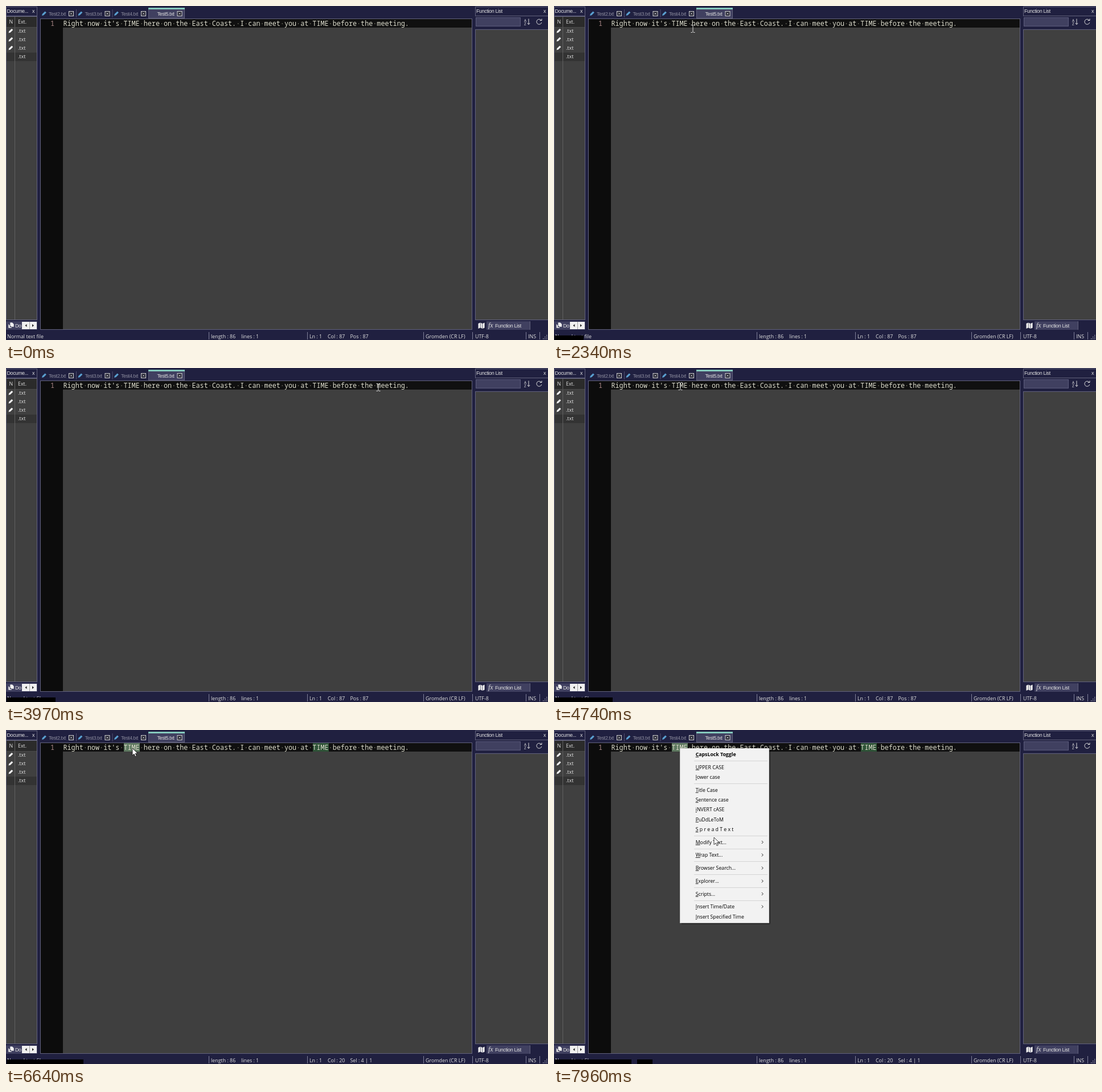
An HTML page for the animation above (7990 ms loop, 952 by 588 pixels).

```html
<!DOCTYPE html>
<html lang="en">
<head>
<meta charset="utf-8">
<title>Editor context menu</title>
<style>
  html, body { margin: 0; width: 100%; height: 100%; overflow: hidden; background: #202040; }
  svg { display: block; width: 952px; height: 588px; }
  text { font-family: "Open Sans", sans-serif; font-size: 8.9px; fill: #e0e0e0; white-space: pre; }
  .tight { font-family: "Liberation Sans", sans-serif; font-size: 9px; letter-spacing: -.4px; }
  .dim { fill: #8a8a9c; }
  .code { font-family: "Noto Sans Mono", monospace; font-size: 11.77px; fill: #dcdccc; }
  .dot { fill: #80806f; }
  .item { font-size: 8.75px; fill: #000; }
  .line { fill: none; stroke: #dcdcdc; stroke-width: 1; }
</style>
</head>
<body>
<svg id="stage" viewBox="0 0 952 588"></svg>
<script>
const LOOP = 7990, SELECT_AT = 5200, MENU_AT = 6750;

const rect = (x, y, w, h, fill, extra = '') =>
  `<rect x="${x}" y="${y}" width="${w}" height="${h}" fill="${fill}" ${extra}/>`;
const frame = (x, y, w, h, fill, stroke) =>
  rect(x + .5, y + .5, w - 1, h - 1, fill, `stroke="${stroke}"`);
const text = (x, y, s, cls = '', extra = '') =>
  `<text x="${x}" y="${y}" class="${cls}" ${extra}>${s}</text>`;
const path = (d, extra = 'class="line"') => `<path d="${d}" ${extra}/>`;
const pencil = (x, y, color) =>
  path(`M${x} ${y + 8}l.8-3 4.7-4.6 2.4 2.2-4.8 4.6z`, `fill="${color}"`);

const EDGE = '#62627c', PANEL = '#404040', RAISED = '#404060';

function leftPanel() {
  const rows = [44, 59, 74, 89].map((y, i) =>
    (i < 3 ? pencil(4.5, y - 4.5, '#f0f0f0') : '') + text(21, y + 3.2, '.txt')).join('');
  return frame(0, 1, 55, 17, '#202040', EDGE) +
    text(1.5, 12, 'Docume...', 'tight') + text(46, 12, 'x', 'tight') +
    frame(0, 18, 55, 535, PANEL, EDGE) +
    rect(1, 19, 53, 18, '#2b2b2b') + rect(1, 82, 53, 15, '#333') +
    rect(15, 19, 1, 533, '#606060') + rect(1, 37, 53, 1, '#4a4a4a') +
    text(5.5, 30.5, 'N') + text(21, 30.5, 'Ext.') + rows +
    rect(0, 555, 55, 15, RAISED) +
    path('M4 560v7h6v-2M7 557h4l3 3v5H7z', 'fill="#f0f0f0" stroke="#404060" stroke-width=".6"') +
    text(16, 566, 'Do', 'tight') +
    rect(28, 556, 26, 13, '#f0f0f0') + rect(41, 556, 1, 13, '#a0a0a0') +
    path('M36.5 560v5l-3-2.500zM46 560v5l3-2.500z', 'fill="#222"');
}

function tabs() {
  const tab = (n, x) => {
    const active = n === 5;
    return (active ? frame(250, 3, 64, 19, RAISED, EDGE) + rect(250, 3, 64, 3, '#84c8bc')
                   : rect(x + 63, 6, 1, 14, '#505070') + pencil(x + 3, 9, '#5aa0d0')) +
      text(x + 15, 17, `Test${n}.txt`, active ? 'tight' : 'tight dim') +
      frame(x + 50, 9, 9, 9, '#181828', '#d8d8d8') +
      path(`M${x + 52.500} 11.500l4 4m0-4l-4 4`);
  };
  return [2, 3, 4, 5].map((n, i) => tab(n, 60 + i * 63.5)).join('');
}

function editor() {
  const line = "Right now it's TIME here on the East Coast. I can meet you at TIME before the meeting.";
  return frame(60, 22, 759, 548, '#3f3f3f', EDGE) +
    rect(61, 23, 39, 546, '#0c0c0c') + rect(100, 23, 718, 15, '#101010') +
    `<g id="marks">${rect(207, 23, 28, 15, '#5d785f')}${rect(539, 23, 28, 15, '#2d5236')}</g>` +
    text(78, 35.2, '1', 'code', 'style="fill:#a88"') +
    text(100.5, 35.2, line.replace(/ /g, '<tspan class="dot">·</tspan>'), 'code');
}

function rightPanel() {
  return frame(824, 1, 130, 17, '#202040', EDGE) +
    text(826, 12, 'Function List', 'tight') + text(944, 12, 'x', 'tight') +
    frame(825, 20, 79, 16, RAISED, '#5c5c7c') +
    text(910, 27.5, 'A', '', 'style="font-size:6.5px"') +
    text(910, 33.5, 'Z', '', 'style="font-size:6.5px"') +
    path('M918 22.500v10m-2.200-2.500l2.200 2.500 2.200-2.500') +
    path('M940 25a4.500 4.500 0 1 0 .8 4M941 22.500v3h-3.500') +
    frame(824, 41, 130, 512, PANEL, EDGE) +
    path('M829.500 559l3.400-1.500v9l-3.400 1.500zM833.500 557.500l3 1.500v9l-3-1.500zM837.200 559l3.400-1.500v9l-3.400 1.500z', 'fill="#eee"') +
    rect(844, 555, 77, 15, RAISED) + rect(920, 555, 1, 15, EDGE) +
    text(847, 566, 'fx', '', 'style="font:italic 12px Liberation Serif,serif"') +
    text(859, 566, 'Function List', 'tight');
}

function statusBar() {
  const cells = [[2, 'Normal text file'], [360, 'length : 86'], [413, 'lines : 1'], [533, 'Ln : 1'],
    [737, 'Gromden (CR LF)'], [824, 'UTF-8'], [917, 'INS']];
  const grip = [[949, 579], [946, 582], [949, 582], [943, 585], [946, 585], [949, 585]];
  return cells.map(([x, s]) => text(x, 584.5, s)).join('') +
    text(565, 584.5, '', '', 'id="col"') + text(604.5, 584.5, '', '', 'id="pos"') +
    [356, 529, 733, 819, 913, 937].map(x => rect(x, 574, 1, 13, '#80809a')).join('') +
    grip.map(([x, y]) => rect(x, y, 1.5, 1.5, '#9090a8')).join('') +
    rect(1, 580, 0, 8, '#000', 'id="barA"') + rect(146, 580, 0, 8, '#000', 'id="barB"');
}

const ITEMS = [[43, 'CapsLock Toggle'], [65.5, 'UPPER CASE'], [83, 'lower case'], [105.5, 'Title Case'],
  [123, 'Sentence case'], [140, 'iNVERT cASE'], [157.5, 'PuDdLeToM'], [175, 'S p r e a d T e x t'],
  [197.5, 'Modify Text...', 1], [220, 'Wrap Text...', 1], [243, 'Browser Search...', 1],
  [266, 'Explorer...', 1], [288.5, 'Scripts...', 1], [311, 'Insert Time/Date', 1],
  [328.5, 'Insert Specified Time']];

function menu() {
  const rules = [54, 94, 186, 209, 231, 254, 277, 300];
  const item = ([y, s, sub], i) =>
    text(248.7, y + 3.2, `<tspan text-decoration="underline">${s[0]}</tspan>${s.slice(1)}`,
      'item', i ? '' : 'font-weight="700"') +
    (sub ? path(`M364.800 ${y - 2.5}l2.500 2.500-2.500 2.500`, 'fill="none" stroke="#222"') : '');
  return `<g id="menu">${rect(224, 35, 156, 307, '#000', 'opacity=".3"')}` +
    frame(221, 32, 157, 308, '#f2f2f2', '#cfcfcf') +
    rect(224, 0, 151, 17, '#91c9f7', 'id="hover"') +
    rules.map(y => rect(246, y, 129, 1, '#d4d4d4')).join('') +
    ITEMS.map(item).join('') + '</g>';
}

const cursors =
  `<g id="beam">${path('M-3.500-6.500h2.500l1 1 1-1h2.500M0-5.500v11M-3.500 6.500h2.500l1-1 1 1h2.500', 'fill="none" stroke="#d8d8d8"')}</g>` +
  `<g id="arrow">${path('M0 0v12.800l3-2.800 2 4.700 2.200-.9-2-4.600h4z', 'fill="#fff" stroke="#111" stroke-width=".8"')}</g>`;

document.getElementById('stage').innerHTML = rect(0, 0, 952, 588, '#202040') +
  leftPanel() + tabs() + editor() + rightPanel() + statusBar() + menu() + cursors;

// Pointer stops: time, x, y
const STOPS = [[0, 868, 610], [340, 868, 610], [560, 640, 465], [820, 424, 350], [1100, 235, 168],
  [1380, 125, 53], [1620, 196, 40], [2000, 222, 34], [2430, 250, 42], [2700, 330, 45], [3000, 520, 46],
  [3260, 621, 46], [3520, 710, 42], [3780, 700, 35], [4060, 632, 34], [4400, 345, 30], [4620, 222, 32],
  [7360, 222, 32], [7560, 238, 72], [7780, 268, 150], [7960, 281, 189], [LOOP, 281, 189]];

function pointerAt(t) {
  const i = Math.max(1, STOPS.findIndex(s => s[0] >= t));
  const [t0, x0, y0] = STOPS[i - 1], [t1, x1, y1] = STOPS[i];
  const k = (t - t0) / (t1 - t0);
  return [x0 + (x1 - x0) * k, y0 + (y1 - y0) * k];
}

const el = id => document.getElementById(id);
const show = (id, on) => el(id).setAttribute('visibility', on ? 'visible' : 'hidden');

function render(t) {
  const selected = t >= SELECT_AT, open = t >= MENU_AT;
  const [x, y] = pointerAt(t);
  const arrow = selected || x > 819 || y > 569;
  for (const id of ['beam', 'arrow'])
    el(id).setAttribute('transform', `translate(${Math.round(x)} ${Math.round(y)})`);
  show('arrow', arrow);
  show('beam', !arrow);
  show('marks', selected);
  show('menu', open);

  const hot = ITEMS.find(([cy]) => Math.abs(cy - y) < 8.4 && y > 34);
  show('hover', open && hot);
  if (hot) el('hover').setAttribute('y', hot[0] - 8.5);

  el('col').textContent = selected ? 'Col : 20' : 'Col : 87';
  el('pos').textContent = selected ? 'Sel : 4 | 1' : 'Pos : 87';

  const end = Math.round(1 + t * .0216);
  el('barA').setAttribute('width', Math.min(end, 136) - 1);
  el('barB').setAttribute('width', Math.max(0, end - 146));
}

const start = performance.now();
function tick() {
  render((performance.now() - start) % LOOP);
  requestAnimationFrame(tick);
}
tick();
</script>
</body>
</html>
```
